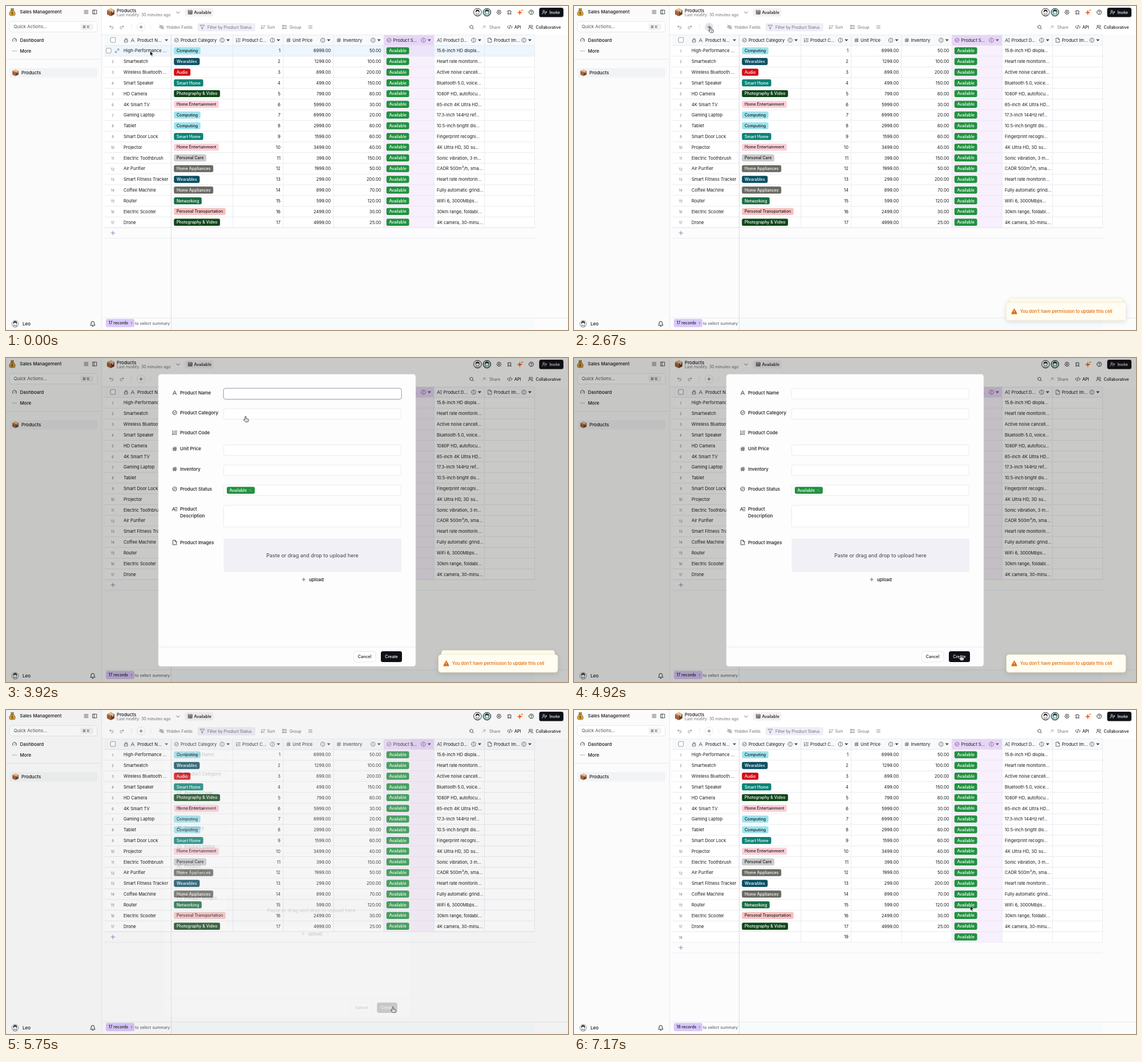
Write an HTML page that moves like this. It is 985x569 px and loops after 7.26 s.

```html
<!DOCTYPE html>
<html lang="en">
<head>
<meta charset="utf-8">
<title>Sales Management</title>
<style>
  html, body { margin: 0; width: 100%; height: 100%; overflow: hidden; background: #fff; }
  svg { display: block; width: 100%; height: 100%; }
  text { font-family: Inter, "Open Sans", sans-serif; white-space: pre; }
</style>
</head>
<body>
<svg id="stage" viewBox="0 0 985 569" xmlns="http://www.w3.org/2000/svg"></svg>
<script>
const LOOP = 7260, FPS = 12;
const INK = '#18181b', GREY = '#71717a', LINE = '#e2e6ee';
const ROW_H = 18.82, TOP = 69.3;

const RING = 'M3 12a9 9 0 1 0 18 0a9 9 0 1 0-18 0';
const ICONS = {
  lock: 'M5 11h14v10H5zM8 11V7a4 4 0 0 1 8 0v4',
  text: 'M4 21 12 3l8 18M7 15h10',
  check: RING + 'M8 12l3 3 5-6',
  info: RING + 'M12 7v6M12 16v1',
  help: RING + 'M9.5 10a2.6 2.6 0 1 1 3.6 2.3c-1 .5-1.1 1-1.1 1.7M12 16.5v.6',
  list: 'M10 5h12M10 12h12M10 19h12M4 3v7M2.5 14h4l-4 6h4',
  hash: 'M3 9h18M3 16h18M10 3 8 21M17 3l-2 18',
  long: 'M1 20 8 4l6 16M4 14h8M15 5h8M16 12h7M16 19h7',
  file: 'M5 2h9l6 6v14H5zM14 2v6h6',
  table: 'M3 3h18v18H3zM3 9h18M3 15h18M9 9v12M15 9v12',
  search: 'M3 11a8 8 0 1 0 16 0a8 8 0 1 0-16 0M17 17l5 5',
  undo: 'M8 14 3 9l5-5M3 9h12a5 5 0 0 1 0 11h-4',
  redo: 'M16 14l5-5-5-5M21 9H9a5 5 0 0 0 0 11h4',
  plus: 'M12 3v18M3 12h18',
  hide: 'M2 12c5-9 15-9 20 0-5 9-15 9-20 0M9 12a3 3 0 1 0 6 0a3 3 0 1 0-6 0M3 2l18 20',
  filter: 'M2 3h20l-8 10v7l-4 2v-9z',
  sort: 'M6 4v16M2 16l4 4 4-4M13 5h9M13 12h6M13 19h4',
  group: 'M3 3h6v6H3zM3 15h6v6H3zM13 4h9M13 8h9M13 16h9M13 20h9',
  rows: 'M3 5h18M3 12h18M3 19h18',
  share: 'M4 20 18 6M8 5h11v11',
  code: 'M7 6l-6 6 6 6M17 6l6 6-6 6M14 4l-4 16',
  users: 'M2 21v-2a5 5 0 0 1 5-5h4a5 5 0 0 1 5 5v2M5 7a4 4 0 1 0 8 0a4 4 0 1 0-8 0M17 3a4 4 0 0 1 0 8M22 21v-2a5 5 0 0 0-4-5',
  invite: 'M1 21v-2a5 5 0 0 1 5-5h4a5 5 0 0 1 5 5v2M4 7a4 4 0 1 0 8 0a4 4 0 1 0-8 0M19 8v7M15.5 11.5h7',
  gear: 'M12 2l2.5 3 4-.5.5 4 3 3.5-3 3.5-.5 4-4-.5-2.5 3-2.5-3-4 .5-.5-4-3-3.5 3-3.5.5-4 4 .5zM9 12a3 3 0 1 0 6 0a3 3 0 1 0-6 0',
  puzzle: 'M9 6a2.6 2.6 0 1 1 5 0h5v5a2.6 2.6 0 1 0 0 5v5h-5a2.6 2.6 0 1 0-5 0H4v-5a2.6 2.6 0 1 0 0-5V6z',
  gauge: 'M5 19a9.5 9.5 0 1 1 14 0M12 14l4-5',
  dots: 'M4 12h.1M12 12h.1M20 12h.1',
  bell: 'M6 9a6 6 0 0 1 12 0c0 7 3 9 3 9H3s3-2 3-9M10 22h4',
  panel: 'M3 3h18v18H3zM9 3v18',
  expand: 'M14 3h7v7M21 3l-8 8M10 21H3v-7M3 21l8-8',
  down: 'M4 8l8 8 8-8',
  left: 'M15 5l-7 7 7 7',
  cross: 'M5 5l14 14M19 5 5 19'
};

const pen = document.createElement('canvas').getContext('2d');
const widthOf = (s, size, weight) => {
  pen.font = `${weight} ${size * 10}px Inter, "Open Sans", sans-serif`;
  return pen.measureText(s).width / 10;
};

// Drawing helpers: y of text is its optical centre.
const text = (x, y, s, { size = 7.6, fill = INK, weight = 400, anchor = 'start', id = '' } = {}) =>
  `<text${id && ` id="${id}"`} x="${x}" y="${y + size * 0.36}" font-size="${size}" fill="${fill}" font-weight="${weight}" text-anchor="${anchor}">${s.replace(/&/g, '&amp;')}</text>`;
const rect = (x, y, w, h, fill, r = 0, stroke = 'none', extra = '') =>
  `<rect x="${x}" y="${y}" width="${w}" height="${h}" rx="${r}" fill="${fill}" stroke="${stroke}" stroke-width=".7" ${extra}/>`;
const line = (x1, y1, x2, y2, color = LINE, w = 0.8) =>
  `<path d="M${x1} ${y1}L${x2} ${y2}" stroke="${color}" stroke-width="${w}"/>`;
const circle = (x, y, r, fill, stroke = 'none', w = 0.8) =>
  `<circle cx="${x}" cy="${y}" r="${r}" fill="${fill}" stroke="${stroke}" stroke-width="${w}"/>`;
const shape = (d, fill, extra = '') => `<path d="${d}" fill="${fill}" ${extra}/>`;
const icon = (name, x, y, size = 9, color = INK, w = 2) =>
  `<path d="${ICONS[name]}" transform="translate(${x - size / 2} ${y - size / 2}) scale(${size / 24})" fill="none" stroke="${color}" stroke-width="${w}" stroke-linecap="round" stroke-linejoin="round"/>`;
const group = (id, body) => `<g id="${id}">${body}</g>`;
const caret = (x, y, color) => shape(`M${x - 3} ${y - 1.6}h6l-3 3.6z`, color);
const checkbox = (x, y) => rect(x, y, 8.6, 8.6, '#fff', 1.8, '#777');
const tag = (x, y, s, fill, ink = '#fff') =>
  rect(x, y - 6.3, widthOf(s, 7.1, 500) + 9.2, 12.4, fill, 2.8) +
  text(x + 4.6, y - 0.2, s, { size: 7.1, fill: ink, weight: 500 });
const box = (x, y, s) => `<g transform="translate(${x} ${y}) scale(${s})">` +
  shape('M-6-3 0-6 6-3 0 0z', '#d79b62') + shape('M-6-3 0 0v7l-6-3z', '#a0623a') +
  shape('M6-3 0 0v7l6-3z', '#6f3f26') + shape('M-3.5-4.3 2.5-1.3v2.5l2-1v-2.5l-6-3z', '#f0cfa4') + '</g>';
const face = (x, y, r, bg, ring = '#111') => circle(x, y, r, bg, ring, 0.9) +
  shape(`M${x - 4} ${y + 4.6}q4-4 8 0q-4 2.600-8 0`, '#fff', 'stroke="#333" stroke-width=".6"') +
  circle(x, y + 0.3, 2.9, '#fff', '#333', 0.6) +
  shape(`M${x - 3.3} ${y}q-.5-4.600 3.300-4.400q3.800-.2 3.300 4.400q-1.400-2-3.300-1.900q-1.900-.1-3.300 1.900`, '#222');

const COLORS = {
  'Computing': ['#9ce3ee', INK], 'Wearables': ['#0b4f63'], 'Audio': ['#d40d17'],
  'Smart Home': ['#0b8376'], 'Photography & Video': ['#11481a'],
  'Home Entertainment': ['#fdd0d9', INK], 'Personal Care': ['#cbcbcb', INK],
  'Home Appliances': ['#6b6a63'], 'Networking': ['#1a6f43'],
  'Personal Transportation': ['#f8c1c0', INK], 'Available': ['#21923f']
};
const PRODUCTS = `High-Performance ...|Computing|6999|50|15.6-inch HD displa...
Smartwatch|Wearables|1299|100|Heart rate monitorin...
Wireless Bluetooth ...|Audio|899|200|Active noise cancell...
Smart Speaker|Smart Home|499|150|Bluetooth 5.0, voice...
HD Camera|Photography & Video|799|80|1080P HD, autofocu...
4K Smart TV|Home Entertainment|5999|30|65-inch 4K Ultra HD...
Gaming Laptop|Computing|8999|20|17.3-inch 144Hz ref...
Tablet|Computing|2999|80|10.5-inch bright dis...
Smart Door Lock|Smart Home|1599|60|Fingerprint recogni...
Projector|Home Entertainment|3499|40|4K Ultra HD, 3D su...
Electric Toothbrush|Personal Care|399|150|Sonic vibration, 3 m...
Air Purifier|Home Appliances|1999|50|CADR 500m³/h, sma...
Smart Fitness Tracker|Wearables|299|200|Heart rate monitorin...
Coffee Machine|Home Appliances|899|70|Fully automatic grind...
Router|Networking|599|120|WiFi 6, 3000Mbps...
Electric Scooter|Personal Transportation|2499|30|30km range, foldabl...
Drone|Photography & Video|4999|25|4K camera, 30-minu...`.split('\n').map(r => r.split('|'));

const EDGES = [289.5, 397.6, 485.8, 574, 662.1, 750.3, 838.5, 926.5];
const HEADS = [['check', 'Product Category'], ['list', 'Product C...'], ['hash', 'Unit Price'],
  ['hash', 'Inventory'], ['check', 'Product S...'], ['long', 'Product D...'], ['file', 'Product Im...']];
const rowY = i => TOP + ROW_H * (i + 0.5);
const right = { anchor: 'end' };

function sidebar() {
  const item = { size: 8, weight: 500 };
  return rect(0, 0, 167.5, 569, '#fbfbfc') + line(167.5, 0, 167.5, 569) +
    shape('M8.5 4.5h5l-1.3 2.8c3 2 4.3 5 3.8 7.5q-.4 2-2.5 2h-5q-2.1 0-2.5-2c-.5-2.5.8-5.5 3.8-7.5z', '#e2a93b', 'stroke="#5d4217" stroke-width=".7"') +
    line(8.5, 7.5, 13.5, 7.5, '#5d4217', 1.2) +
    text(11, 12.6, '$', { size: 6.5, fill: '#5d4217', weight: 700, anchor: 'middle' }) +
    text(24.3, 10.6, 'Sales Management', item) +
    icon('rows', 140.5, 10.5, 9) + icon('panel', 155.5, 10.5, 9) +
    rect(6, 27.3, 154, 18.4, '#fff', 4, '#e0e0e6') + text(13.5, 36.5, 'Quick Actions...', { size: 7.9, fill: '#52525b' }) +
    rect(130.5, 31, 22.5, 11, '#f1f1f4', 2) + text(134, 36.5, '⌘ K', { size: 6.3, fill: '#52525b', weight: 500 }) +
    icon('gauge', 15, 60, 9) + text(24.5, 60, 'Dashboard', item) +
    icon('dots', 15, 79, 8, INK, 3.5) + text(24.5, 79, 'More', item) +
    line(0, 93.5, 167, 93.5) +
    rect(6, 109, 154, 16.5, '#f2f3f4', 3) + box(16.5, 116.8, 0.9) + text(27, 117, 'Products', item) +
    face(16, 558, 5.8, '#fff', '#8a8a8a') + text(29, 558, 'Leo', item) + icon('bell', 152, 558, 11);
}

function topBar() {
  const small = { size: 7.06, weight: 500 }, soft = { size: 7.06, fill: GREY };
  return box(183.5, 10.5, 1.08) + text(194, 7.8, 'Products', { size: 8, weight: 500 }) +
    text(194, 15.4, 'Last modify: 30 minutes ago', soft) + icon('down', 301.5, 11.5, 8) +
    rect(313.5, 3.8, 50, 14.6, '#f2f2f4', 3.5) + icon('table', 323, 11, 8.5) + text(329.5, 11, 'Available', small) +
    face(826.5, 11, 6.8, '#fff') + face(843, 11, 6.8, '#8fd6d6') +
    icon('gear', 864, 11, 9.5) + icon('puzzle', 882.5, 11, 9) +
    shape('M900.5 6.5l1.3 3.7 3.7 1.3-3.7 1.3-1.3 3.7-1.3-3.7-3.7-1.3 3.7-1.3zM904.5 5.5l.6 1.4 1.4.6-1.4.6-.6 1.4-.6-1.4-1.4-.6 1.4-.6z', '#f4661b') +
    icon('help', 920.5, 11, 10.5) +
    rect(934.5, 3, 42.5, 16.5, '#101019', 3.5) + icon('invite', 944, 11, 9, '#fff') + text(952.5, 11.2, 'Invite', { ...small, fill: '#fff' }) +
    icon('undo', 185, 37.2, 8.5, GREY) + icon('redo', 203, 37.2, 8.5, GREY) +
    line(220, 32, 220, 42) + line(253, 32, 253, 42) +
    circle(236.7, 37, 7.3, '#fff', '#e0e0e6') + group('plusHover', circle(237, 37, 7, '#e4e4ec')) + icon('plus', 236.7, 37, 7.5) +
    icon('hide', 272.7, 37, 9.5, GREY) + text(281.5, 37, 'Hidden Fields', soft) +
    rect(335.5, 30, 101.5, 14.5, '#efedf7', 3) + icon('filter', 344, 37, 9, GREY) + text(353, 37, 'Filter by Product Status', soft) +
    icon('sort', 450.5, 37, 9, GREY) + text(457.5, 37, 'Sort', soft) +
    icon('group', 488, 37, 8.5, GREY) + text(497, 37, 'Group', soft) + icon('rows', 533.5, 37, 8, GREY) +
    icon('search', 816, 37, 8.5) + icon('share', 837.5, 37, 7, GREY) + text(847, 37, 'Share', soft) +
    icon('code', 883, 37, 9.5) + text(891, 37, 'API', small) +
    icon('users', 919.5, 37, 9) + text(928.5, 37, 'Collaborative', { size: 7, weight: 500 });
}

function record([name, kind, price, stock, about], i) {
  const y = rowY(i), num = { size: 5.9, fill: GREY, anchor: 'middle', id: 'n' + i };
  return text(187, y + 0.8, String(i + 1), num) + text(206, y, name) + tag(294.3, y, kind, ...COLORS[kind]) +
    text(481, y, String(i + 1), right) + text(569.3, y, price + '.00', right) + text(657.6, y, stock + '.00', right) +
    tag(666.8, y, 'Available', COLORS.Available[0]) + text(755, y, about);
}

const cellLines = (y0, y1) => EDGES.map(x => line(x, y0, x, y1)).join('');

function grid() {
  const end = TOP + ROW_H * 17;
  let s = rect(168, 51, 817, 518, '#fcfcfd') + rect(172.5, 51, 754, end - 51, '#fff') +
    rect(172.5, 51, 754, TOP - 51, '#f8f9fb') + rect(662.1, TOP, 88.2, end - TOP, '#f8f0fc');
  s += group('hover', rect(172.5, TOP, 754, ROW_H, '#edf5fd') + rect(662.1, TOP, 88.2, ROW_H, '#ece4f8') +
    checkbox(175.6, 74.2) + icon('expand', 194.7, 78.6, 8, '#52525b'));
  s += rect(662.1, 51, 88.2, TOP - 51, '#e6d6f6');
  for (let i = 0; i <= 17; i++) s += line(172.5, TOP + ROW_H * i, 926.5, TOP + ROW_H * i);
  s += line(168, 50.8, 926.5, 50.8) + cellLines(51, end) +
    checkbox(183.2, 55.3) + icon('lock', 210.5, 60, 9, '#3f3f46') + icon('text', 222, 60, 8.5, '#3f3f46') +
    text(230, 60, 'Product N...') + caret(281.2, 60, '#52525b');
  HEADS.forEach(([ic, label], i) => {
    const l = EDGES[i], r = EDGES[i + 1], c = i === 4 ? '#6b4a8c' : '#3f3f46';
    s += icon(ic, l + 9.3, 60, 9, c) + text(l + 16.5, 60, label) + icon('info', r - 18.8, 60, 10, c, 1.7) + caret(r - 8.4, 60, c);
  });
  s += PRODUCTS.map(record).join('');
  s += group('added', rect(172.5, end, 754, ROW_H, '#fff') + rect(662.1, end, 88.2, ROW_H, '#f8f0fc') +
    line(172.5, end, 926.5, end) + cellLines(end, end + ROW_H) +
    text(187, rowY(17) + 0.8, '18', { size: 5.9, fill: GREY, anchor: 'middle' }) +
    text(481, rowY(17), '18', { ...right, id: 'serial' }) + tag(666.8, rowY(17), 'Available', COLORS.Available[0]));
  s += group('adder', line(172.5, end, 926.5, end) + icon('plus', 187.3, rowY(17), 9, '#6366a8') +
    line(172.5, end + ROW_H, 926.5, end + ROW_H));
  s += rect(289.5, 548, 637, 21, '#f7fbfd') + line(168, 547.8, 985, 547.8) + line(289.5, 51, 289.5, 569, '#d3d3df') +
    rect(175, 549.5, 50, 14.5, '#d9c8fb', 3) + text(179.5, 556.8, '17 records', { size: 7.06, weight: 500, id: 'count' }) +
    icon('left', 220.3, 556.8, 6.5) + text(226, 557.5, 'to select summary', { size: 7.06, fill: '#52525b' });
  return s + group('picked', rect(289.7, TOP, 108, ROW_H - 0.2, 'none', 0, '#222', 'style="stroke-width:1"') +
    icon('lock', 393.3, 73, 7));
}

function dialog() {
  const field = (y, h = 18.6) => rect(381.5, y, 311, h, '#fff', 3, '#dfe2ea');
  const labels = [['text', 'Product Name', 61], ['check', 'Product Category', 96], ['list', 'Product Code', 131.3],
    ['hash', 'Unit Price', 159.6], ['hash', 'Inventory', 195], ['check', 'Product Status', 230],
    ['long', 'Product', 265.3], ['file', 'Product Images', 324]];
  const label = { size: 7.95, weight: 500 };
  return rect(267, 28.5, 451, 513, '#fdfdfe', 4.5, '#e4e4e7') +
    labels.map(([ic, s, y]) => icon(ic, 295.6, y, 9.5) + text(305, y, s, label)).join('') +
    text(305, 277.2, 'Description', label) +
    [53.5, 89, 152.5, 188, 223].map(y => field(y)).join('') + field(258.5, 38.4) +
    group('focus', rect(381.2, 53.2, 312, 19.2, '#fff', 3.5, '#9496a8', 'style="stroke-width:1"')) +
    group('status', rect(387, 226.2, 49, 12.2, COLORS.Available[0], 2.8) +
      text(391.5, 232.2, 'Available', { size: 7.1, fill: '#fff', weight: 500 }) + icon('cross', 428, 232.5, 5, '#d5ead9')) +
    rect(381.5, 317, 311.5, 58.6, '#f0f0f6', 3) + text(537, 346.6, 'Paste or drag and drop to upload here', { size: 9, fill: '#3f3f46', anchor: 'middle' }) +
    icon('plus', 521.8, 389, 7.5) + text(531, 389, 'upload', label) +
    line(267, 507.5, 718, 507.5) +
    rect(609.5, 515.3, 38.5, 18.5, '#fff', 3.5, '#dedee4') + text(628.5, 524.3, 'Cancel', { size: 7.06, weight: 500, anchor: 'middle' }) +
    group('create', rect(657, 515, 37, 19, '#101019', 3.5) + text(675.5, 524.3, 'Create', { size: 7.06, fill: '#fff', weight: 500, anchor: 'middle' }));
}

const toast = id => group(id, rect(758, 521, 209, 31, '#fffcf1', 4.5, '#fbf3d2', 'style="filter:drop-shadow(0 2px 4px rgba(0,0,0,.13))"') +
  shape('M771.6 531.6l4.6 8.3q.3.9-.6.9h-8q-.9 0-.6-.9z', '#dd6a09', 'stroke="#dd6a09" stroke-linejoin="round"') +
  line(771.6, 534.2, 771.6, 537.3, '#fff', 1) + line(771.6, 538.6, 771.6, 539.6, '#fff', 1) +
  text(781.8, 536.4, "You don't have permission to update this cell", { size: 7.55, fill: '#dd6a09', weight: 500 }));

const pointers = group('pointer',
  group('arrow', shape('M0 0v8.3l1.9-1.7 1.3 3 1.5-.7-1.3-2.9h2.6z', '#000', 'stroke="#fff" stroke-width=".7"')) +
  group('hand', shape('M-1 .9a1 1 0 0 1 2 0v3l3.5.8q1 .3.9 1.4l-.5 2.6q-.2 1-1.1 1H.3q-.7 0-1.1-.6L-3.4 5.9q.5-1.2 2.4.2z', '#fff', 'stroke="#111" stroke-width=".8"') +
    line(1.2, 6, 1.2, 8, '#111', 0.5) + line(2.8, 6, 2.8, 8, '#111', 0.5)) +
  group('beam', shape('M-1.8 0q1.8 0 1.8 1v6q0 1-1.8 1M1.8 0q-1.8 0-1.8 1v6q0 1 1.8 1', 'none', 'stroke="#222" stroke-width=".8"')));

document.getElementById('stage').innerHTML = rect(0, 0, 985, 569, '#fff') + grid() + sidebar() + topBar() +
  group('shade', rect(0, 0, 985, 569, 'rgba(12,12,0,.22)')) + group('dialog', dialog()) + toast('first') + toast('second') + pointers;

// Key times below are ticks of 1/12 s.
const PATH = [[2, 252.5, 79], [6, 348.5, 85], [21, 348.5, 85], [30, 239.2, 37], [36, 239.2, 37], [44, 388.5, 58.5],
  [45, 392, 66], [47, 419.8, 102.5], [57, 678, 521.5], [85, 678, 521.5], [86, 694.5, 344]];
const KIND = [[0, 'arrow'], [30, 'hand'], [38, 'arrow'], [43, 'beam'], [46, 'hand'], [50, 'arrow'], [57, 'hand'],
  [61, 'arrow'], [69, 'hand'], [86, 'arrow']];
const OPEN = [[34, 0], [35, 0.5], [36, 0.9], [37, 1], [68, 1], [69, 0.18], [70, 0.18], [71, 0]];
// shift, scale, opacity
const FIRST = [[7, 46, 1, 0], [8, 31, 1, 0.4], [10, 8, 1, 0.9], [12, 0, 1, 1], [17, 0, 1, 1], [21, -8.2, 0.95, 1], [54, -8.2, 0.95, 1], [57, 2, 0.95, 0]];
const SECOND = [[17, 46, 1, 0], [18, 31, 1, 0.4], [20, 8, 1, 0.9], [22, 0, 1, 1], [65, 0, 1, 1], [67, 17, 1, 0.65], [68, 26, 1, 0.35], [69, 31, 1, 0]];

function at(keys, n) {
  const i = keys.findIndex(k => k[0] >= n);
  if (i < 0) return keys[keys.length - 1].slice(1);
  if (i === 0) return keys[0].slice(1);
  const [a, b] = [keys[i - 1], keys[i]], p = (n - a[0]) / (b[0] - a[0]);
  return a.slice(1).map((v, j) => v + (b[j + 1] - v) * p);
}

const $ = id => document.getElementById(id);
const show = (id, on) => $(id).setAttribute('opacity', +on);
const place = (id, cx, cy, dy, k, o) => {
  $(id).setAttribute('transform', `translate(${cx} ${cy + dy}) scale(${k}) translate(${-cx} ${-cy})`);
  show(id, o);
};

function draw(n) {
  show('hover', n < 32);
  show('n0', n >= 32);
  show('picked', n >= 7 && n < 32);
  show('plusHover', n >= 30 && n < 38);
  show('focus', n < 59);
  show('create', n >= 61 && n < 69 ? 0.5 : 1);
  show('status', n < 69);

  const [p] = at(OPEN, n);
  show('shade', p);
  place('dialog', 492.5, 284.5, 10 * (1 - p), 0.95 + 0.05 * p, p);
  place('first', 862.5, 536.5, ...at(FIRST, n));
  place('second', 862.5, 536.5, ...at(SECOND, n));

  const added = n >= 71;
  show('added', added);
  $('adder').setAttribute('transform', `translate(0 ${added ? ROW_H : 0})`);
  $('count').textContent = (added ? 18 : 17) + ' records';
  $('serial').textContent = n >= 74 ? 19 : 18;

  const [x, y] = at(PATH, n), kind = KIND.filter(k => k[0] <= n).pop()[1];
  $('pointer').setAttribute('transform', `translate(${x} ${y})`);
  for (const k of ['arrow', 'hand', 'beam']) show(k, k === kind);
}

const start = performance.now();
let last = -1;
function tick() {
  const n = Math.floor((performance.now() - start) % LOOP * FPS / 1000 + 0.001);
  if (n !== last) draw(last = n);
  requestAnimationFrame(tick);
}
tick();
</script>
</body>
</html>
```
